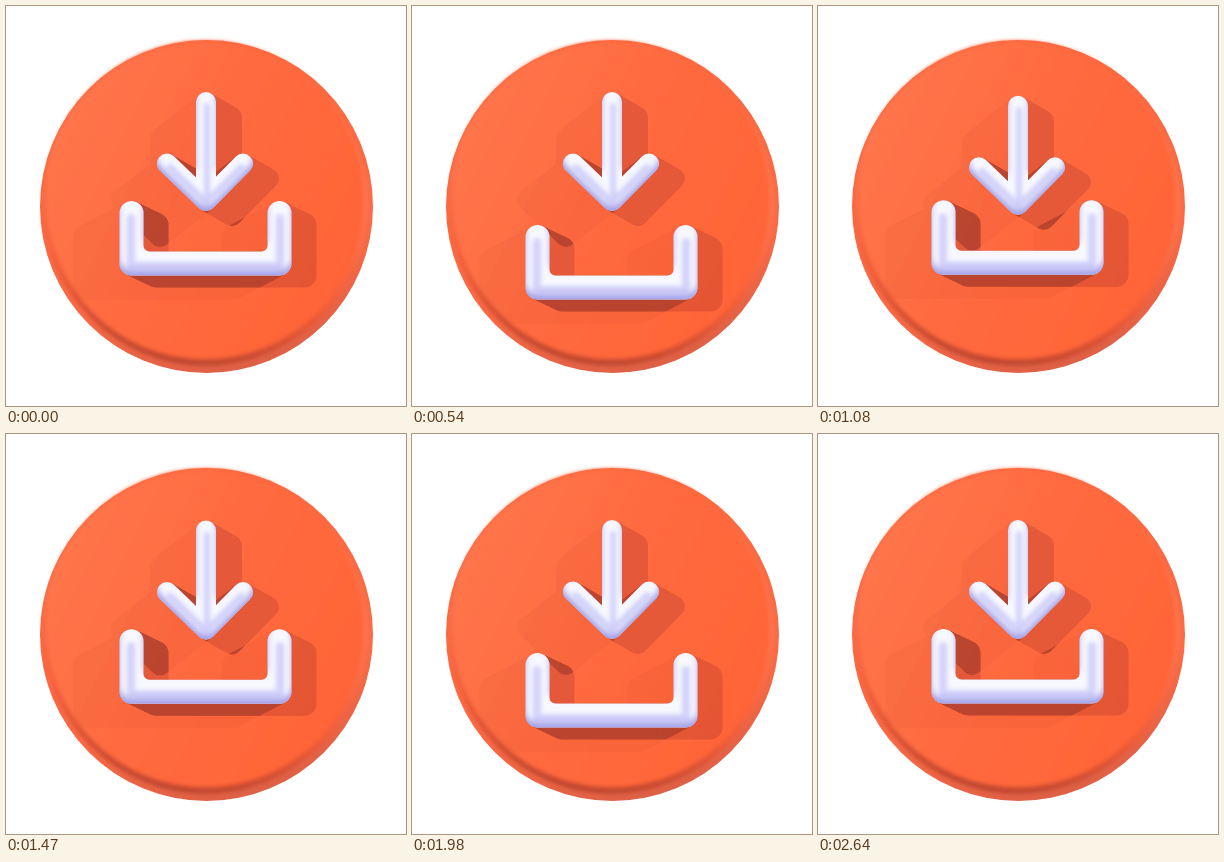
An HTML page that plays this animation: 400 by 400 pixels, repeating every 2880 ms.

```html
<!DOCTYPE html>
<html lang="en">
<head>
<meta charset="utf-8">
<title>Download button</title>
<style>
  html, body { margin: 0; width: 100%; height: 100%; overflow: hidden; background: #fff; }
  svg { display: block; width: 100vw; height: 100vh; }
  .tube { fill: none; stroke-linecap: round; stroke-linejoin: round; }
</style>
</head>
<body>
<svg viewBox="0 0 400 400">
  <defs>
    <linearGradient id="rim" x1=".3" y1="0" x2=".6" y2="1">
      <stop offset="0" stop-color="#f9683f"/>
      <stop offset=".7" stop-color="#fb6a45"/>
      <stop offset="1" stop-color="#dd6046"/>
    </linearGradient>
    <linearGradient id="crease" x1=".6" y1="0" x2=".4" y2="1">
      <stop offset="0" stop-color="#f9653d"/>
      <stop offset=".4" stop-color="#ff7b54"/>
      <stop offset=".75" stop-color="#f05c38"/>
      <stop offset="1" stop-color="#b8422c"/>
    </linearGradient>
    <linearGradient id="face" x1="0" y1=".2" x2="1" y2=".7">
      <stop offset="0" stop-color="#ff764d"/>
      <stop offset=".5" stop-color="#ff6a3f"/>
      <stop offset="1" stop-color="#ff6436"/>
    </linearGradient>
    <filter id="soft" x="-20%" y="-20%" width="140%" height="140%"><feGaussianBlur stdDeviation="2"/></filter>
    <!-- Darkens the underside of a tube. -->
    <filter id="under" filterUnits="userSpaceOnUse" x="80" y="60" width="240" height="260">
      <feGaussianBlur in="SourceAlpha" stdDeviation="3"/>
      <feOffset dy="-6" result="raised"/>
      <feFlood flood-color="#8d8ae6" flood-opacity=".85"/>
      <feComposite in2="raised" operator="out"/>
      <feComposite in2="SourceAlpha" operator="in" result="shade"/>
      <feMerge><feMergeNode in="SourceGraphic"/><feMergeNode in="shade"/></feMerge>
    </filter>
    <clipPath id="disc"><circle cx="199" cy="195" r="160"/></clipPath>
    <g id="arrow" class="tube" stroke-width="20">
      <path d="M200 96V190"/>
      <path d="M161 157.500L200 195L237 157.500"/>
    </g>
    <path id="tray" class="tube" stroke-width="24"
      d="M125.500 207V257.500H273.500V207M125.500 239.500a18 18 0 0 0 18 18H255.500a18 18 0 0 0 18-18"/>
    <mask id="nearMask" maskUnits="userSpaceOnUse" x="0" y="0" width="400" height="400">
      <g class="near" stroke="#fff"></g>
    </mask>
  </defs>

  <circle cx="200.500" cy="200.500" r="166.500" fill="url(#rim)"/>
  <circle cx="199.500" cy="197.500" r="162" fill="url(#crease)" filter="url(#soft)"/>
  <circle cx="199" cy="194.500" r="159" fill="url(#face)" filter="url(#soft)"/>

  <g clip-path="url(#disc)" stroke="#a0302c">
    <g class="far" opacity=".06"></g>
    <g class="near" opacity=".28"></g>
    <g mask="url(#nearMask)"><g class="far" opacity=".38" stroke="#7c2a20"></g></g>
  </g>

  <g data-part="tray">
    <g filter="url(#under)">
      <use href="#tray" stroke="#f8f8ff"/>
      <path class="tube" d="M125 212V260H274V212" stroke="#d3d2fb" stroke-width="8" filter="url(#soft)"/>
    </g>
  </g>
  <g data-part="arrow">
    <g filter="url(#under)">
      <use href="#arrow" stroke="#f8f8ff"/>
      <g class="tube" stroke="#d3d2fb" stroke-width="6" filter="url(#soft)">
        <path d="M201 100V194"/>
        <path d="M164 161L200 196L235 161"/>
      </g>
    </g>
  </g>
</svg>
<script>
  const NS = 'http://www.w3.org/2000/svg';
  const LOOP = 1440, STEP = 30;
  // [time in ms, vertical offset]
  const arrowKeys = [[0, 0], [270, 15], [540, 0], [840, 14.5], [1200, 0]];
  const trayKeys = [[0, 0], [540, 24], [840, -3], [1200, 0]];

  // A cast shadow is its shape swept along the light direction.
  function sweep(group, part, dx, dy) {
    const g = document.createElementNS(NS, 'g'), copies = 26;
    g.dataset.part = part;
    for (let i = 0; i <= copies; i++) {
      const use = document.createElementNS(NS, 'use');
      use.setAttribute('href', '#' + part);
      use.setAttribute('transform', `translate(${dx * i / copies} ${dy * i / copies})`);
      g.append(use);
    }
    group.append(g);
  }

  function valueAt(keys, t) {
    const next = keys.findIndex(k => k[0] > t);
    if (next < 0) return keys[keys.length - 1][1];
    const [t0, a] = keys[next - 1], [t1, b] = keys[next];
    const p = (t - t0) / (t1 - t0);
    return a + (b - a) * p * p * (3 - 2 * p);
  }

  for (const far of document.querySelectorAll('.far')) {
    sweep(far, 'tray', -46, 24);
    sweep(far, 'arrow', -46, 36);
  }
  for (const near of document.querySelectorAll('.near')) {
    sweep(near, 'tray', 25, 12);
    sweep(near, 'arrow', 26, 15);
  }
  const parts = name => document.querySelectorAll(`[data-part=${name}]`);
  const arrows = parts('arrow'), trays = parts('tray');
  const place = (nodes, y) => nodes.forEach(n => n.setAttribute('transform', `translate(0 ${y})`));

  const start = performance.now();
  function draw() {
    const t = Math.floor((performance.now() - start) / STEP) * STEP % LOOP;
    place(arrows, valueAt(arrowKeys, t));
    place(trays, valueAt(trayKeys, t));
    requestAnimationFrame(draw);
  }
  draw();
</script>
</body>
</html>
```
